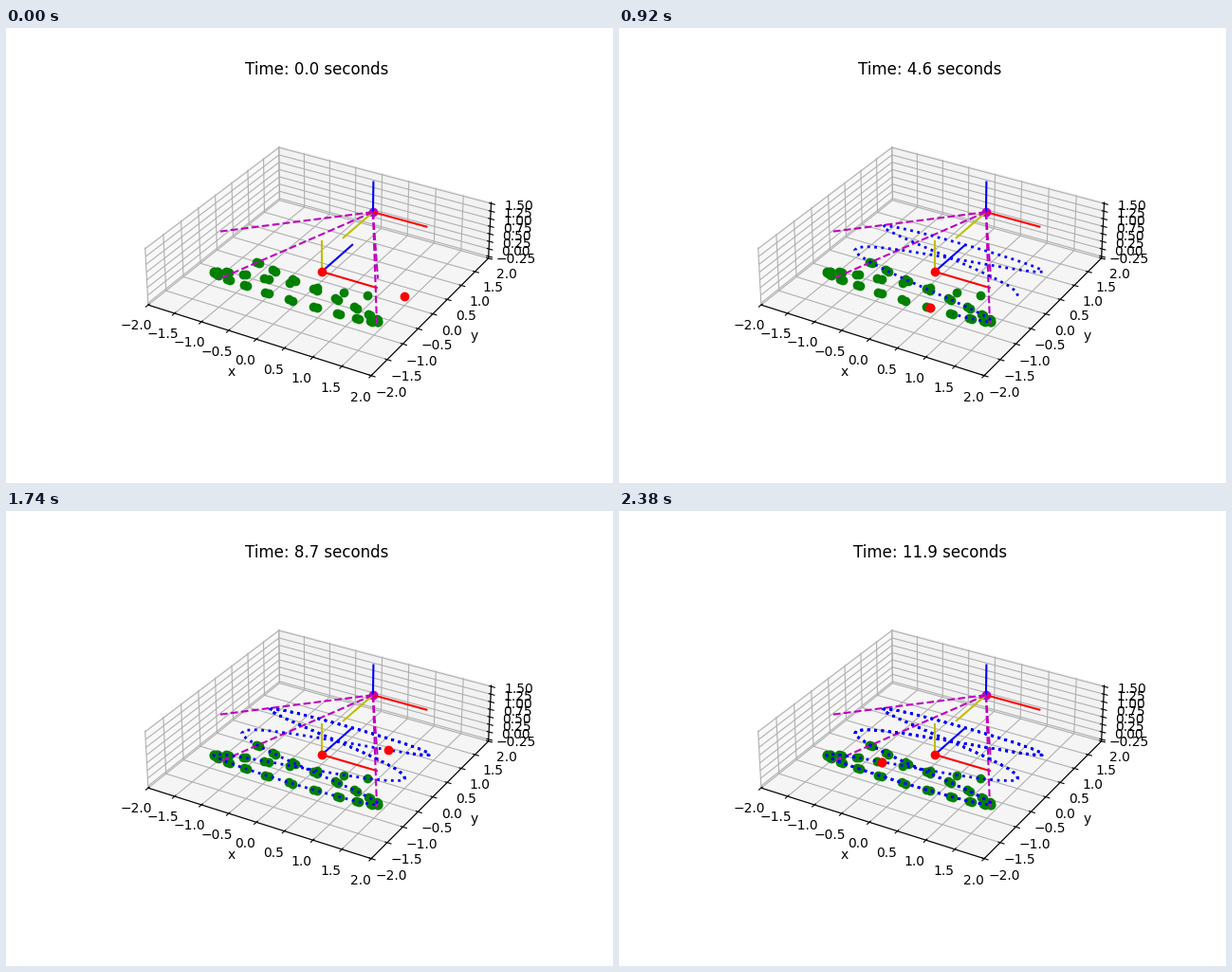
Animation, 640 px wide and 480 px high, one loop 2.4 s. Source, as a matplotlib script:

```python
import numpy as np
import matplotlib.pyplot as plt
from matplotlib.animation import FuncAnimation

FRAMES = 120
STEP = 0.1

# Lissajous path on the ground plane
t = np.arange(FRAMES) * STEP
path = np.array([1.5 * np.cos(3 * t), np.sin(t), np.zeros(FRAMES)])
seen = path[:, path[1] < -0.2]

# Camera looking along -y, with a 60 x 30 degree field of view
CAMERA = np.array([0, 1.7, 0.5])
REACH = 3
HALF_WIDTH, HALF_HEIGHT = np.radians([30, 15])

fig = plt.figure(figsize=(6.4, 4.8), dpi=100)
ax = fig.add_subplot(projection="3d")


def segment(start, end, style):
    ax.plot(*zip(start, end), style)


def triad(origin, y_axis, z_axis):
    for axis, style in (((1, 0, 0), "r-"), (y_axis, "y-"), (z_axis, "b-")):
        segment(origin, origin + np.array(axis), style)


def ray(azimuth, elevation):
    flat = np.cos(elevation)
    return REACH * np.array([flat * np.sin(azimuth),
                             -flat * np.cos(azimuth),
                             np.sin(elevation)])


ax.plot(*seen, "go")

# World frame
triad(np.zeros(3), (0, 0, 1), (0, 1, 0))
ax.plot([0], [0], [0], "ro")

# Camera frame and the edges of its view
ax.plot(*CAMERA[:, None], "mo")
triad(CAMERA, (0, -1, 0), (0, 0, 1))
for elevation in (HALF_HEIGHT, -HALF_HEIGHT):
    for azimuth in (-HALF_WIDTH, HALF_WIDTH):
        segment(CAMERA, CAMERA + ray(azimuth, elevation), "m--")

trace, = ax.plot([], [], [], "b:", lw=2)
dot, = ax.plot([], [], [], "ro")

# Height range: lowest ray to the tip of the camera's axis, plus a margin
low = CAMERA[2] - REACH * np.sin(HALF_HEIGHT)
high = CAMERA[2] + 1
pad = (high - low) / 48
ax.set(xlim=(-2, 2), ylim=(-2, 2), xlabel="x", ylabel="y")
ax.set_xticks(np.arange(-2, 2.1, 0.5))
ax.set_yticks(np.arange(-2, 2.1, 0.5))
ax.set_zticks(np.arange(-0.25, 1.6, 0.25))
ax.set_zlim(low - pad, high + pad)
ax.set_box_aspect((4, 4, 25 / 24))
title = ax.set_title("")


def update(n):
    trace.set_data_3d(*path[:, :n])
    dot.set_data_3d(*path[:, n:n + 1])
    title.set_text(f"Time: {n * STEP:.1f} seconds")
    return trace, dot, title


anim = FuncAnimation(fig, update, frames=FRAMES, interval=20,
                     repeat=True, repeat_delay=0, blit=False)
plt.show()
```
